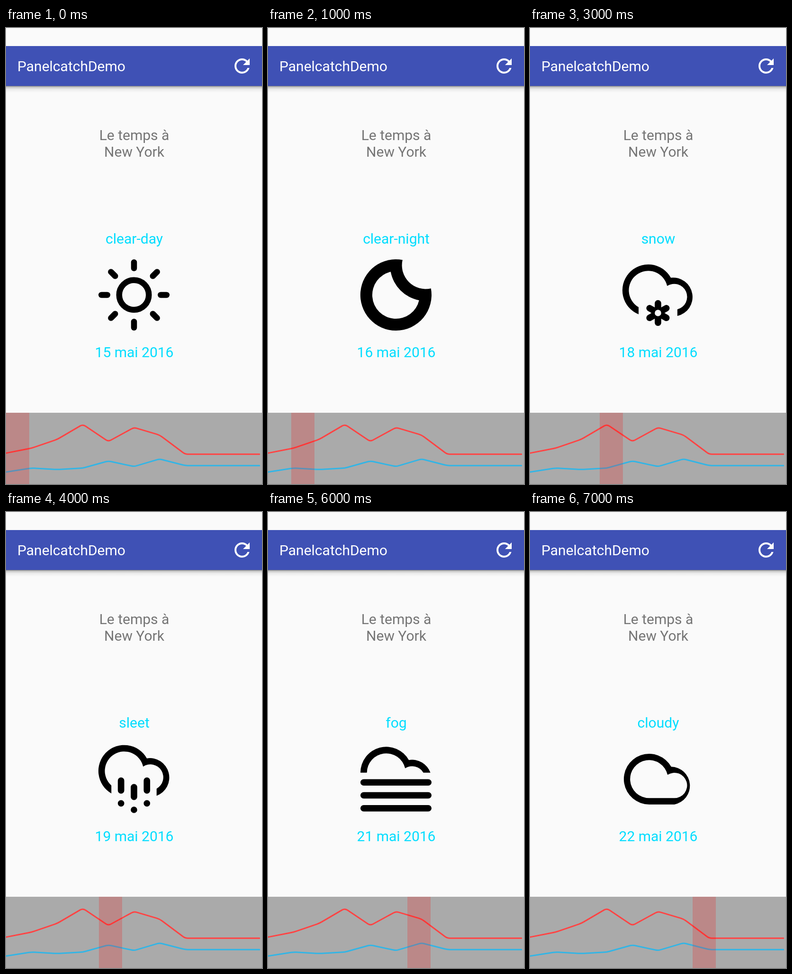
An HTML page that plays this animation: 540 by 960 pixels, repeating every 8000 ms.

```html
<!DOCTYPE html>
<html lang="fr">
<head>
<meta charset="utf-8">
<style>
  html, body { margin: 0; width: 100%; height: 100%; overflow: hidden; background: #fafafa; }
  svg { display: block; width: 540px; height: 960px; }
  text { font: 30px Roboto, sans-serif; }
  .mid { text-anchor: middle; fill: #757575; }
  .cyan { fill: #00ddff; }
  .line { fill: none; stroke: #000; stroke-width: 4; stroke-linecap: round; }
  .plot { fill: none; stroke-width: 3; stroke-linecap: round; }
</style>
</head>
<body>
<svg viewBox="0 0 540 960">
  <defs>
    <linearGradient id="shade" x2="0" y2="1">
      <stop offset="0" stop-opacity=".5"/>
      <stop offset=".15" stop-opacity=".22"/>
      <stop offset=".5" stop-opacity=".06"/>
      <stop offset="1" stop-opacity="0"/>
    </linearGradient>
  </defs>
  <rect width="540" height="960" fill="#fafafa"/>
  <rect y="122" width="540" height="14" fill="url(#shade)"/>
  <rect y="38" width="540" height="84" fill="#3f51b5"/>
  <text x="24" y="91" fill="#fff">PanelcatchDemo</text>
  <path transform="translate(474 56) scale(2)" fill="#fff" d="M17.65 6.35C16.2 4.9 14.21 4 12 4c-4.42 0-7.99 3.58-7.99 8s3.57 8 7.99 8c3.73 0 6.84-2.55 7.73-6h-2.08c-.82 2.33-3.04 4-5.65 4-3.31 0-6-2.69-6-6s2.69-6 6-6c1.66 0 3.14.69 4.22 1.78L13 11h7V4z"/>
  <text class="mid" x="270.5" y="236">Le temps à</text>
  <text class="mid" x="270.5" y="271">New York</text>
  <text class="mid cyan" id="label" x="270.5" y="454"/>
  <g id="icon"/>
  <text class="mid cyan" id="date" x="270.5" y="693"/>
  <rect y="810" width="540" height="150" fill="#aaa"/>
  <path class="plot" id="cold" stroke="#33b5e5"/>
  <path class="plot" id="warm" stroke="#ff4444"/>
  <rect id="band" y="810" width="49" height="150" fill="red" fill-opacity=".2"/>
</svg>
<script>
const $ = id => document.getElementById(id);
const fill = d => `<path d="${d}"/>`;
const line = d => `<path class="line" d="${d}"/>`;

// Clouds: two overlapping rings, the large one centred on the origin, the small one on (16, 4).
const OUT = '13.965 -7.795', IN = '11.665 -2.71';
const low = (r, x) => Math.sqrt(r * r - x * x);
const openCloud = (left, right) => {
  const x = right - 16;
  return fill(`M${left} ${low(16, left)}A16 16 0 1 1 ${OUT}A12 12 0 0 1 ${right} ${4 + low(12, x)}
    V${4 + low(8, x)}A8 8 0 1 0 ${IN}A12 12 0 1 0 ${left} ${low(12, left)}Z`);
};

const spokes = (count, from, to) => Array.from({ length: count }, (_, i) => {
  const a = i * 2 * Math.PI / count, x = Math.sin(a), y = Math.cos(a);
  return line(`M${from * x} ${from * y}L${to * x} ${to * y}`).replace('class', `stroke-linejoin="round" class`);
}).join('');

const place = (x, y, scale, shapes) =>
  `<g transform="translate(${x} ${y}) scale(${scale})">${shapes}</g>`;

const WIDE = 150 / 44;
const icons = {
  'clear-day': place(270, 562, 3.125,
    '<circle class="line" r="10"/>' + spokes(8, 18, 22)),
  'clear-night': place(270, 562, 6.25,
    fill(`M0 12A12 12 0 1 1 2.207 -11.79A8 8 0 0 0 11.79 -2.207A12 12 0 0 1 0 12Z
      M-1.788 -7.792A8 8 0 1 0 7.791 1.788A12 12 0 0 1 -1.788 -7.792Z`)),
  rain: place(249.5, 545.2, WIDE,
    openCloud(-8, 20) + line('M-2 6v14M6 10v14M14 6v14')),
  snow: place(249.5, 552.3, WIDE,
    openCloud(-6, 18) + place(6, 14, 1, spokes(6, 0, 6) + '<circle r="2" fill="#fafafa"/>')),
  sleet: place(249.5, 545.2, WIDE,
    openCloud(-8, 20) + line('M-2 6v6M6 10v6M14 6v6M-2 20h0M6 24h0M14 20h0')),
  wind: place(239.45, 540.2, 150 / 54,
    fill(`M0 16A16 16 0 1 1 ${OUT}A12 12 0 0 1 27.8 1.8Q25.6 .4 23 .13A8 8 0 0 0 ${IN}A12 12 0 1 0 0 12Z`) +
    line('M22 6a4 4 0 0 1 0 8H0a4 4 0 0 0 0 8H22a4 4 0 0 1 0 8M32 10a4 4 0 0 1 0 8h-3')),
  fog: place(249.5, 548.8, WIDE,
    fill(`M-16 0A16 16 0 0 1 ${OUT}A12 12 0 0 1 27.31 0H22.93A8 8 0 0 0 ${IN}A12 12 0 0 0 -12 0Z`) +
    line('M-14 6H26M-14 14H26M-14 22H26')),
  cloudy: place(251.3, 562.3, 10 / 3,
    fill(`M0 16A16 16 0 1 1 ${OUT}A12 12 0 0 1 16 16ZM0 12H16A8 8 0 1 0 ${IN}A12 12 0 1 0 0 12Z`))
};

// Polyline with corners rounded over a tenth of each segment.
function plot(id, ys) {
  const at = (i, f) => `${(i + f) * 54} ${ys[i] + (ys[i + 1] - ys[i]) * f}`;
  let d = 'M' + at(0, .01);
  for (let i = 0; i < ys.length - 1; i++) {
    d += 'L' + at(i, .9);
    if (i < ys.length - 2) d += `Q${at(i + 1, 0)} ${at(i + 1, .1)}`;
  }
  $(id).setAttribute('d', d);
}
plot('warm', [895, 884.5, 866, 834.5, 870.5, 841, 857, 897.3, 897.3, 897.3, 897.3]);
plot('cold', [934.8, 926.5, 929.5, 926.5, 911.5, 923.2, 907.3, 921.2, 921.2, 921.2, 921.2]);

const names = Object.keys(icons);
let shown = -1;
function frame(now) {
  const day = Math.floor(now / 1000) % names.length;
  if (day !== shown) {
    shown = day;
    $('label').textContent = names[day];
    $('date').textContent = `${15 + day} mai 2016`;
    $('icon').innerHTML = icons[names[day]];
    $('band').setAttribute('x', day * 49);
  }
  requestAnimationFrame(frame);
}
frame(performance.now());
</script>
</body>
</html>
```
